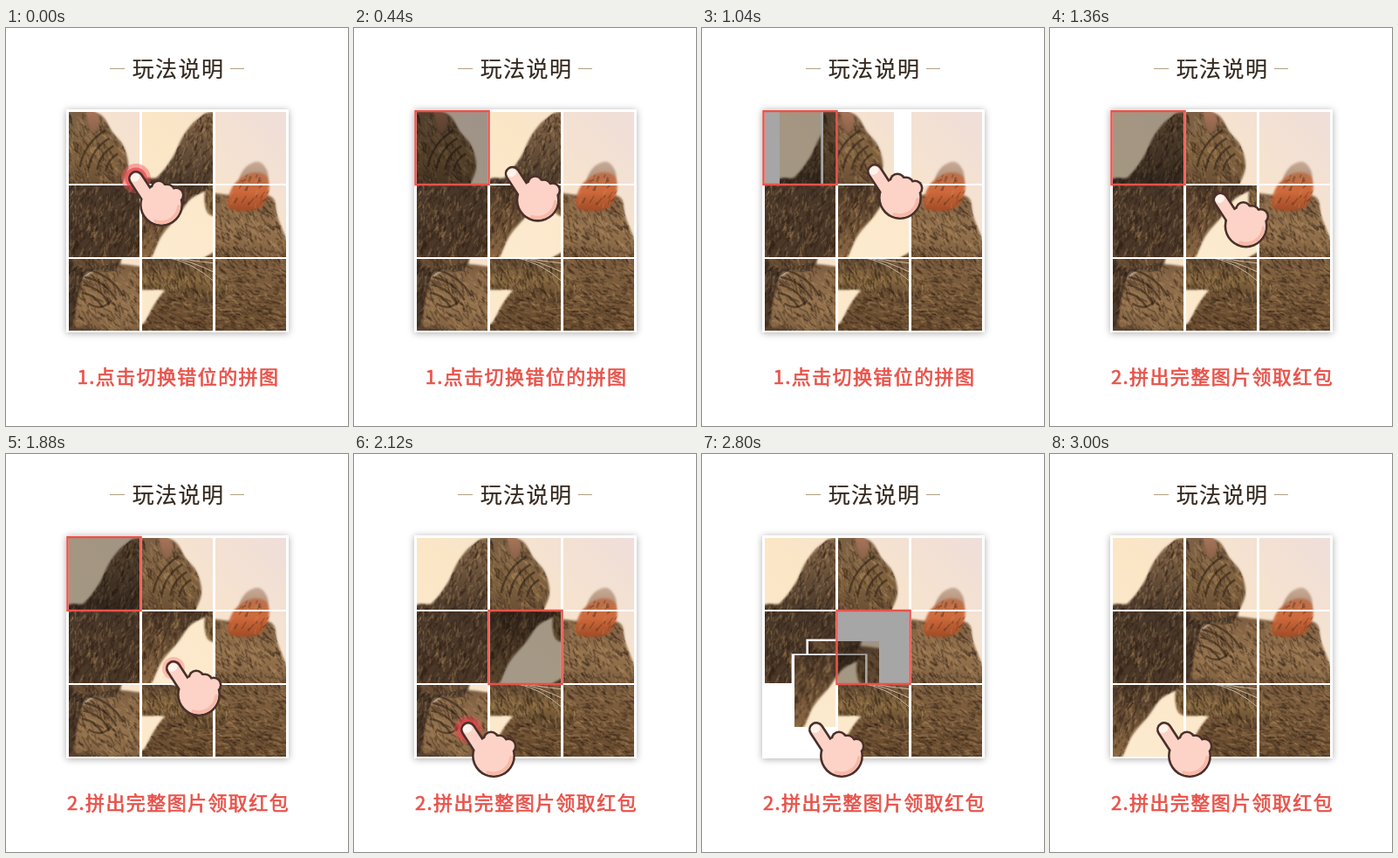
These frames come from a looping animation (392x455 px, 4000 ms). An HTML page with a canvas:

```html
<!DOCTYPE html>
<html lang="zh">
<head>
<meta charset="utf-8">
<style>
  html, body { margin: 0; width: 100%; height: 100%; overflow: hidden; background: #fff; }
  canvas { display: block; }
</style>
</head>
<body>
<canvas id="stage" width="392" height="455"></canvas>
<script>
const LOOP = 4000, STEP = 40;
const LEFT = 72, TOP = 96, PITCH = 84, TILE_W = 81, TILE_H = 82;
const RED = '#e8534b', FONT = '"Noto Sans CJK SC", "Noto Sans CJK", sans-serif';
const ctx = document.getElementById('stage').getContext('2d');

const clamp = v => Math.max(0, Math.min(1, v));
const progress = (t, from, to) => clamp((t - from) / (to - from));
const mix = (a, b, p) => a + (b - a) * p;
const cell = i => ({ x: LEFT + (i % 3) * PITCH, y: TOP + Math.floor(i / 3) * PITCH });

let seed = 7;
const random = () => (seed = (seed * 16807) % 2147483647) / 2147483647;

// ---- Cat picture, painted once in stage coordinates ----
const photo = document.createElement('canvas');
photo.width = photo.height = 3 * PITCH;
const art = photo.getContext('2d');
art.translate(-LEFT, -TOP);

// Closed smooth curve through "x,y x,y ..." key points.
function smooth(text) {
  const pts = text.split(' ').map(p => p.split(',').map(Number));
  const at = i => pts[(i + pts.length) % pts.length];
  const path = new Path2D();
  path.moveTo(...pts[0]);
  pts.forEach((p, i) => {
    const before = at(i - 1), next = at(i + 1), after = at(i + 2);
    path.bezierCurveTo(
      p[0] + (next[0] - before[0]) / 6, p[1] + (next[1] - before[1]) / 6,
      next[0] - (after[0] - p[0]) / 6, next[1] - (after[1] - p[1]) / 6, ...next);
  });
  return path;
}

// Soft-edged shape shaded from top to bottom, with seeded fur strokes inside.
function furry(points, colors, angle = 0, density = 0) {
  const path = smooth(points);
  const ys = points.split(' ').map(p => +p.split(',')[1]);
  const top = Math.min(...ys), bottom = Math.max(...ys);
  const shade = art.createLinearGradient(0, top, 0, bottom);
  colors.forEach((c, i) => shade.addColorStop(i / Math.max(1, colors.length - 1), c));
  art.fillStyle = shade;
  art.filter = 'blur(1px)';
  art.fill(path);
  art.filter = 'none';
  art.save();
  art.clip(path);
  for (let i = 0; i < density * (bottom - top); i++) {
    const x = LEFT + random() * 252, y = mix(top, bottom, random());
    const a = angle + random() - .5, length = 3 + random() * 8;
    art.strokeStyle = random() < .6 ? '#2a1c1250' : '#c39b6a38';
    art.lineWidth = .8 + random() * 1.8;
    art.beginPath();
    art.moveTo(x, y);
    art.lineTo(x + Math.cos(a) * length, y + Math.sin(a) * length);
    art.stroke();
  }
  art.restore();
}

function arcs(x, y, radius, gap, count, from, to) {
  art.strokeStyle = '#2c1f1690';
  art.lineWidth = 2.5;
  for (let i = 0; i < count; i++) {
    art.beginPath();
    art.arc(x, y, radius + gap * i, from, to);
    art.stroke();
  }
}

function paintPhoto() {
  const sky = art.createLinearGradient(72, 345, 321, 96);
  ['#fdebd0', '#fbe6c6', '#efdeda'].forEach((c, i) => sky.addColorStop(i / 2, c));
  art.fillStyle = sky;
  art.fillRect(LEFT, TOP, 252, 252);

  furry('240,250 322,262 332,355 150,355 160,335 183,299', ['#8b6a47', '#765839', '#66492d'], .4, 18);
  furry('156,225 170,205 192,190 215,186 258,191 302,192 311,215 322,268 250,275 160,270',
    ['#7c5d40', '#95734e', '#74573a'], .9, 16);
  arcs(165, 252, 34, 9, 4, -1.4, -.5);
  arcs(190, 218, 17, 0, 1, .6, 2.3);

  furry('268,178 274,160 290,153 300,166 296,182', ['#c7aa96', '#a9866c']);
  furry('256,206 260,181 280,166 298,169 301,188 288,207', ['#b9714c', '#cf6a3c', '#a54e28'], 2.2, 5);

  furry('64,190 90,170 107,148 120,122 136,104 156,96 200,110 215,186 180,195 168,215 160,262 150,268 128,279 113,299 94,322 80,350 64,352',
    ['#86684a', '#49382a', '#4c3828', '#8f6b45'], 1.9, 16);
  furry('153,98 190,98 205,118 218,134 224,155 220,172 208,185 165,188 154,150',
    ['#7c6045', '#80623f', '#654b33'], 1.1, 14);
  arcs(226, 168, 28, 10, 4, 3.3, 4.2);
  furry('176,94 190,100 190,112 182,119', ['#a9775b', '#8d624a']);

  furry('148,262 185,260 225,272 252,293 250,309 225,314 183,300 148,296',
    ['#584230', '#86683f', '#5b432c'], 1.2, 20);
  art.strokeStyle = '#efe0c9bb';
  art.lineWidth = 1;
  for (let i = 0; i < 3; i++) {
    art.beginPath();
    art.moveTo(182 + i * 5, 262);
    art.quadraticCurveTo(212, 266, 240, 291 - i * 11);
    art.stroke();
  }
}

// ---- Pointing hand, drawn relative to its fingertip ----
const STOPS = [
  { x: 149, y: 172, arrive: 0, leave: 240 },
  { x: 198, y: 164, arrive: 540, leave: 1160 },
  { x: 192, y: 245, arrive: 1660, leave: 1920 },
  { x: 131, y: 315, arrive: 2080, leave: LOOP },
];
const TAPS = [[0, 240], [600, 860], [1720, 1960], [2080, 2480]];

function handPosition(t) {
  const i = STOPS.findLastIndex(s => t >= s.arrive);
  const stop = STOPS[i], next = STOPS[i + 1] || stop;
  const p = t < stop.leave ? 0 : progress(t, stop.leave, next.arrive);
  return [mix(stop.x, next.x, p), mix(stop.y, next.y, p)];
}

function disc(x, y, r, color) {
  ctx.fillStyle = color;
  ctx.beginPath();
  ctx.arc(x, y, r, 0, Math.PI * 2);
  ctx.fill();
}

// Fist, knuckles and finger; "inset" leaves room for the outline.
function handShape(color, inset) {
  disc(29, 30, 25 - inset, color);
  for (let i = 0; i < 3; i++) disc(26 + i * 10, 11 + i * 4, 9.5 - inset, color);
  ctx.strokeStyle = color;
  ctx.lineWidth = 18 - 2 * inset;
  ctx.lineCap = 'round';
  ctx.beginPath();
  ctx.moveTo(0, 0);
  ctx.lineTo(17, 26);
  ctx.stroke();
}

function drawHand(t) {
  ctx.save();
  ctx.translate(...handPosition(t));
  const tap = TAPS.find(([from, to]) => t >= from && t < to);
  if (tap) {
    const p = progress(t, ...tap), size = 1 - .35 * p;
    ctx.globalAlpha = 1 - .5 * p;
    disc(0, 0, 17 * size, '#f0505a70');
    disc(0, 0, 12.5 * size, '#ee4048b0');
    ctx.globalAlpha = 1;
  }
  handShape('#49302a', 0);
  handShape('#fdd3c7', 2.6);
  ctx.strokeStyle = '#f7b9a9';
  ctx.lineWidth = 4;
  ctx.beginPath();
  ctx.arc(29, 30, 20.2, .1, 1.9);
  ctx.stroke();
  ctx.fillStyle = '#fff4ec';
  ctx.beginPath();
  ctx.ellipse(-1, -1, 5.5, 4.5, -.4, 0, Math.PI * 2);
  ctx.fill();
  ctx.restore();
}

// ---- Board ----
function drawTile(piece, from, to = from, p = 0) {
  const a = cell(from), b = cell(to), source = cell(piece);
  const x = mix(a.x, b.x, p), y = mix(a.y, b.y, p);
  ctx.fillStyle = '#fff';
  ctx.fillRect(x - 3, y - 2, TILE_W + 6, TILE_H + 4);
  ctx.drawImage(photo, source.x - LEFT, source.y - TOP, TILE_W, TILE_H, x, y, TILE_W, TILE_H);
}

function drawSelection(i) {
  const { x, y } = cell(i);
  ctx.fillStyle = 'rgba(0,0,0,.35)';
  ctx.fillRect(x, y, TILE_W, TILE_H);
  ctx.strokeStyle = RED;
  ctx.lineWidth = 2.5;
  ctx.strokeRect(x - 1.5, y - 1, TILE_W + 3, TILE_H + 2);
}

function drawBoard(t) {
  ctx.save();
  ctx.shadowColor = 'rgba(0,0,0,.32)';
  ctx.shadowBlur = 8;
  ctx.shadowOffsetY = 1;
  ctx.fillStyle = '#fff';
  ctx.fillRect(69, 93, 255, 255);
  ctx.restore();

  const first = progress(t, 880, 1080), second = progress(t, 2500, 3000);
  drawTile(3, 3);
  drawTile(0, 1, 0, first);
  drawTile(1, 0, 1, first);
  drawTile(4, 6, 4, second);
  drawTile(6, 4, 6, second);
  for (const i of [2, 5, 7, 8]) drawTile(i, i);

  if (t >= 240 && t < 3000) drawSelection(t < 1960 ? 0 : 4);
}

function label(text, y, size, color, spacing, boldness) {
  ctx.font = `${size}px ${FONT}`;
  ctx.letterSpacing = spacing + 'px';
  ctx.textAlign = 'center';
  ctx.fillStyle = ctx.strokeStyle = color;
  ctx.lineWidth = boldness;
  ctx.lineJoin = 'round';
  ctx.fillText(text, 197.5, y);
  ctx.strokeText(text, 197.5, y);
  ctx.lineJoin = 'miter';
}

function draw(t) {
  ctx.fillStyle = '#fff';
  ctx.fillRect(0, 0, 392, 455);
  label('玩法说明', 56, 25, '#35291f', 1.4, .2);
  ctx.fillStyle = '#b3a184';
  ctx.fillRect(119, 46, 17, 1);
  ctx.fillRect(257, 46, 16, 1);
  drawBoard(t);
  label(t < 1200 ? '1.点击切换错位的拼图' : '2.拼出完整图片领取红包', 407, 22, RED, 1.4, .7);
  drawHand(t);
}

function frame() {
  draw(Math.floor(performance.now() % LOOP / STEP) * STEP);
  requestAnimationFrame(frame);
}

paintPhoto();
frame();
</script>
</body>
</html>
```
